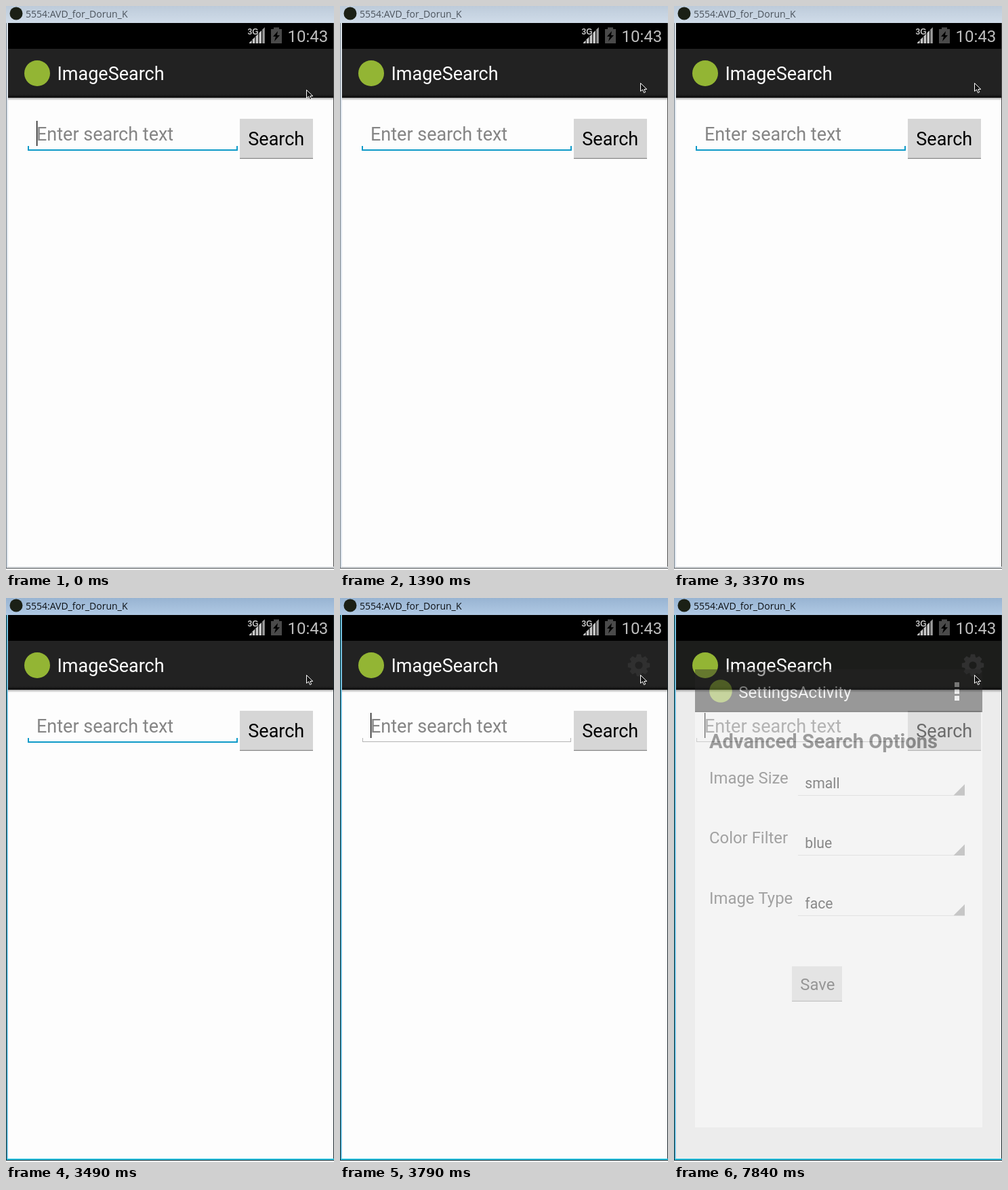
An HTML page with a canvas that plays this animation: 484 by 830 pixels, repeating every 7.99 s.

```html
<!DOCTYPE html>
<html lang="en">
<head>
<meta charset="utf-8">
<title>Image search</title>
<style>
html, body { margin: 0; width: 100%; height: 100%; overflow: hidden; background: #fff; }
canvas { display: block; width: 484px; height: 830px; }
</style>
</head>
<body>
<canvas id="stage" width="484" height="830"></canvas>
<script>
const W = 484, H = 830, LOOP = 7990;
const ACTIVE = 3490, PRESS = 3640, RELEASE = 3790, OPEN = 7530, SETTLE = 7840;
const CARET_FLIPS = [430, 830, 1390, 1860, 2440, 2970, 3370, RELEASE];
const ROBOTO = 'Roboto, sans-serif';

const stage = document.getElementById('stage').getContext('2d');
const layer = Object.assign(document.createElement('canvas'), { width: W, height: H });
const sheet = layer.getContext('2d');

function box(c, color, x, y, w, h) {
  c.fillStyle = color;
  c.fillRect(x, y, w, h);
}

function dot(c, color, x, y, r) {
  c.fillStyle = color;
  c.beginPath();
  c.arc(x, y, r, 0, Math.PI * 2);
  c.fill();
}

function poly(c, color, points) {
  c.fillStyle = color;
  c.beginPath();
  points.forEach(([x, y]) => c.lineTo(x, y));
  c.closePath();
  c.fill();
}

function text(c, str, x, y, size, color, weight = 400, family = ROBOTO) {
  c.font = `${weight} ${size}px ${family}`;
  c.fillStyle = color;
  c.fillText(str, x, y);
}

function fade(c, y0, y1, from, to) {
  const g = c.createLinearGradient(0, y0, 0, y1);
  g.addColorStop(0, from);
  g.addColorStop(1, to);
  return g;
}

function drawWindow(c, active) {
  box(c, '#fff', 0, 0, W, H);
  box(c, active ? '#9fc0df' : '#dbe3ec', 0, 0, W, 828);
  box(c, active ? fade(c, 0, 25, '#98b4d2', '#b0c9e4') : fade(c, 0, 25, '#bdcbda', '#d0dce9'), 0, 0, W, 25);
  box(c, active ? '#1c2730' : '#78848f', 0, 25, 1, 803);
  box(c, active ? '#3cc4e2' : '#e2e8ee', 1, 25, 1, 803);
  box(c, '#fdfdfd', 3, 25, 480, 800);
  box(c, active ? '#202b30' : '#4c4c4c', 483, 25, 1, 803);
  box(c, active ? '#2fc6e4' : '#dcdfe2', 1, 825, 483, 2);
  box(c, active ? '#16282e' : '#555a5e', 0, 827, W, 1);
  dot(c, '#1b2016', 15, 11, 9.5);
  text(c, '5554:AVD_for_Dorun_K', 29, 17, 14, active ? '#0c1014' : '#4b535c', 400, '"Open Sans", sans-serif');
}

function drawStatus(c) {
  box(c, '#000', 3, 25, 480, 38);
  text(c, '3G', 356.5, 42, 12, '#c4c4c4', 700, '"Liberation Sans", sans-serif');
  for (let i = 0; i < 5; i++) {
    const x = 359 + i * 4.8, top = 55 - (x - 358);
    poly(c, i < 4 ? '#c8c8c8' : '#9a9a9a', [[x, 55], [x, top], [x + 3.6, top - 3.6], [x + 3.6, 55]]);
  }
  box(c, '#4a4a4a', 391, 34, 16, 21);
  box(c, '#4a4a4a', 395, 31.5, 8, 3);
  poly(c, '#000', [[401, 37], [394, 45], [398, 45], [396, 52], [404, 43], [400, 43]]);
  text(c, '10:43', 415.5, 53, 24, '#bebebe');
}

function drawGear(c, back) {
  c.save();
  c.translate(441, 99);
  for (let i = 0; i < 8; i++) {
    poly(c, '#303030', [[-4.5, -10], [-3, -16.2], [3, -16.2], [4.5, -10]]);
    c.rotate(Math.PI / 4);
  }
  dot(c, '#303030', 0, 0, 12.5);
  dot(c, back, 0, 0, 5.6);
  c.restore();
}

function drawActionBar(c, t) {
  const back = t < OPEN ? '#222' : '#1c1d1b';
  box(c, back, 3, 63, 480, 72);
  box(c, fade(c, 130, 135, back, '#0c0c0c'), 3, 130, 480, 5);
  box(c, fade(c, 135, 139, 'rgba(0,0,0,.32)', 'rgba(0,0,0,0)'), 3, 135, 480, 4);
  const pressed = t >= PRESS && t < RELEASE;
  if (pressed) box(c, '#295d70', 399, 63, 84, 72);
  if (t >= PRESS) drawGear(c, pressed ? '#295d70' : back);
  dot(c, '#93b534', 46, 99, 19);
  text(c, 'ImageSearch', 75.5, 109, 27, '#fff');
}

function drawField(c, focused, caret) {
  const color = focused ? '#0e9ac8' : '#b4b4b4';
  const [x, right, bottom, line] = focused ? [32, 342, 213, 2] : [33, 341, 212, 1];
  box(c, color, x, bottom - line, right - x, line);
  box(c, color, x, 206, line, bottom - 206);
  box(c, color, right - line, 206, line, bottom - 206);
  text(c, 'Enter search text', 45, 198, 27, '#858585');
  if (caret) box(c, '#000', 45, 169, 1.3, 37);
}

function drawButton(c, label, x, y, w, h, size, baseline, color, ink) {
  box(c, color, x, y, w, h);
  box(c, 'rgba(0,0,0,.34)', x, y + h - 1.3, w, 1.3);
  text(c, label, x + 12.3, baseline, size, ink);
}

function drawSettings(c, t) {
  c.clearRect(0, 0, W, H);
  box(c, '#fff', 31, 105, 424, t < SETTLE ? 672.5 : 674);
  box(c, '#262626', 31, 105, 424, 63);
  box(c, '#111', 31, 166, 424, 2);
  if (t < SETTLE) box(c, '#555', 31, 105, 424, 1);
  dot(c, '#93b534', 69, 137, 16.8);
  text(c, 'SettingsActivity', 95.3, 146.5, 24, '#fff');
  for (let i = 0; i < 3; i++) box(c, '#f4f4f4', 414, 124 + i * 10, 7, 7);

  text(c, 'Advanced Search Options', 52, 221, 29.1, '#2e2e2e', 700);
  [['Image Size', 'small'], ['Color Filter', 'blue'], ['Image Type', 'face']].forEach(([label, value], i) => {
    const y = 290 + i * 88.4;
    text(c, label, 52, y - 17, 23.9, '#3c3c3c');
    text(c, value, 193.3, y - 10, 21.2, '#000');
    box(c, '#d4d4d4', 183, Math.round(y), 246, 1);
    poly(c, '#929292', [[429, y - 16], [429, y + 0.5], [412.5, y + 0.5]]);
  });
  drawButton(c, 'Save', 174, 542, 74, 52, 23.9, 576.5, '#dadada', '#202020');
}

function drawPointer(c, y) {
  c.save();
  c.translate(443.5, y + 0.5);
  poly(c, '#111', [[0, 0], [0, 12], [3, 9.5], [5, 14.2], [7.2, 13.2], [5.3, 9], [9.3, 9]]);
  c.strokeStyle = '#fff';
  c.lineWidth = 1;
  c.stroke();
  c.restore();
}

function draw(t) {
  const c = stage;
  const caret = CARET_FLIPS.filter(at => at <= t).length % 2 === 0;
  drawWindow(c, t >= ACTIVE);
  drawStatus(c);
  drawActionBar(c, t);
  drawField(c, t < RELEASE, caret);
  drawButton(c, 'Search', 345, 166, 108, 59, 27, 205, '#d6d6d6', '#000');
  if (t >= OPEN) {
    box(c, 'rgba(0,0,0,.065)', 3, 135, 480, 690);
    drawSettings(sheet, t);
    c.globalAlpha = 0.42;
    c.drawImage(layer, 0, 0);
    c.globalAlpha = 1;
  }
  drawPointer(c, t < 280 ? 123 : 113);
}

const start = performance.now();
function tick() {
  draw((performance.now() - start) % LOOP);
  requestAnimationFrame(tick);
}
tick();
</script>
</body>
</html>
```
